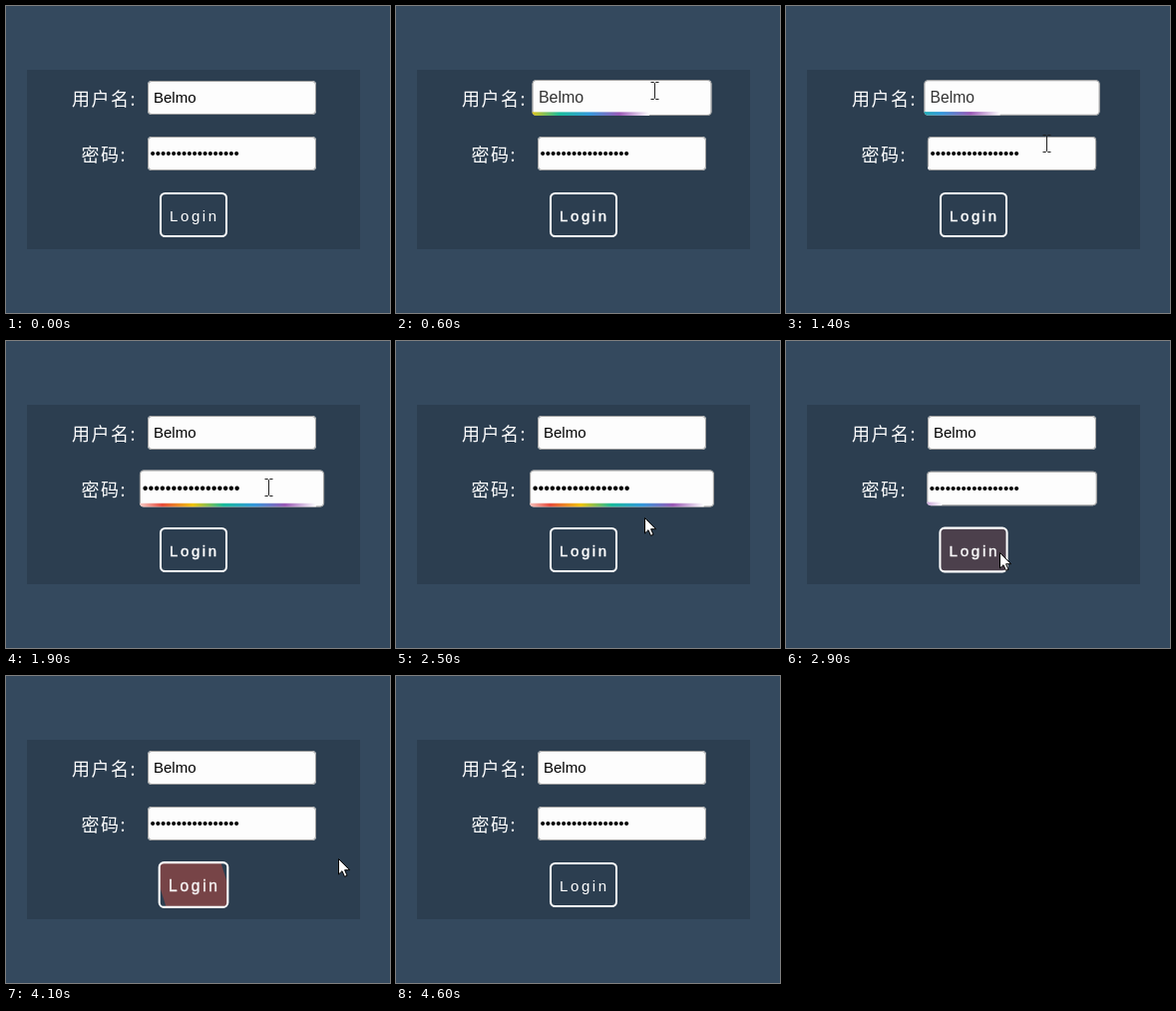
Recreate the animation shown at these times as an HTML page. Size 385x308 px, loop 4.7 s.

```html
<!DOCTYPE html>
<html lang="zh">
<head>
<meta charset="utf-8">
<title>Login form</title>
<style>
  html, body { margin: 0; width: 100%; height: 100%; overflow: hidden; background: #34495e; }
  svg { display: block; width: 385px; height: 308px; }
  .label { font: 18px "Noto Sans CJK SC", "Noto Sans CJK", sans-serif; letter-spacing: 1.5px; fill: #fff; }
  .value { font: 15px "Liberation Sans", Arial, sans-serif; }
  .login { font: 15px "Liberation Sans", Arial, sans-serif; letter-spacing: 2.6px; fill: #fff; stroke: #fff; }
  .edge { fill: none; stroke: #767676; stroke-opacity: .7; }
</style>
</head>
<body>
<svg viewBox="0 0 385 308">
  <defs>
    <linearGradient id="rainbow">
      <stop offset="0" stop-color="#fff"/>
      <stop offset=".167" stop-color="#e74c3c"/>
      <stop offset=".333" stop-color="#f1c40f"/>
      <stop offset=".5" stop-color="#1abc9c"/>
      <stop offset=".667" stop-color="#3498db"/>
      <stop offset=".833" stop-color="#9b59b6"/>
      <stop offset="1" stop-color="#fff"/>
    </linearGradient>
    <clipPath id="fieldClip"><rect x="-84.5" y="-17" width="169" height="34" rx="4"/></clipPath>
    <clipPath id="buttonClip"><rect x="-33" y="-21.5" width="66" height="43" rx="4"/></clipPath>
  </defs>
  <rect width="385" height="308" fill="#34495e"/>
  <rect x="21" y="64" width="334" height="180" fill="#2c3e50"/>
  <text class="label" x="66" y="99.5">用户名:</text>
  <text class="label" x="75.5" y="155.5">密码:</text>
  <g id="fields"></g>
  <g id="button">
    <g clip-path="url(#buttonClip)"><rect id="band" y="-60" height="120" fill="#e74c3c"/></g>
    <rect x="-33" y="-21.5" width="66" height="43" rx="4.5" fill="none" stroke="#fff" stroke-width="2"/>
    <text class="login" id="login" x="-24" y="6">Login</text>
  </g>
  <path id="arrow" d="M.5 .5V16L4 12.7L6.5 18.3L9 17.2L6.6 11.7H11.6Z" fill="#fff" stroke="#000"/>
  <path id="beam" d="M-4 -8.5H-1L0 -7.5L1 -8.5H4M0 -7.5V7.5M-4 8.5H-1L0 7.5L1 8.5H4" fill="none" stroke="#222"/>
</svg>
<script>
const LOOP = 4700, STEP = 100, FADE = 700;
const $ = id => document.getElementById(id);
const mix = (a, b, p) => a + (b - a) * p;

// CSS "ease": cubic-bezier(.25, .1, .25, 1)
function ease(x) {
  if (x <= 0) return 0;
  if (x >= 1) return 1;
  const bezier = (a, b, s) => 3 * a * s * (1 - s) ** 2 + 3 * b * s * s * (1 - s) + s ** 3;
  let lo = 0, hi = 1;
  for (let i = 0; i < 24; i++) {
    const mid = (lo + hi) / 2;
    if (bezier(.25, .25, mid) < x) lo = mid; else hi = mid;
  }
  return bezier(.1, 1, lo);
}

const hover = (t, enter, leave) =>
  ease((t - enter) / FADE) * (1 - ease((t - leave) / FADE));

const fields = [
  { y: 92, text: "Belmo", textX: -78.5, enter: 334, leave: 1170 },
  { y: 148, text: "•".repeat(17), textX: -82, enter: 1385, leave: 2450 }
];

$("fields").innerHTML = fields.map(f => `
  <g>
    <rect x="-84.5" y="-17" width="169" height="34" rx="4" fill="#fdfdfd"/>
    <rect class="edge" x="-84" y="-16.5" width="168" height="33" rx="3.5"/>
    <g clip-path="url(#fieldClip)">
      <rect class="line" y="13.5" width="169" height="3.5" fill="url(#rainbow)"/>
    </g>
    <text class="value" x="${f.textX}" y="5">${f.text}</text>
  </g>`).join("");
fields.forEach((f, i) => {
  f.group = $("fields").children[i];
  f.line = f.group.querySelector(".line");
  f.label = f.group.querySelector("text");
});

// time, x, y
const path = [
  [200, 376, 70], [300, 328, 73], [400, 300, 78], [600, 259, 85],
  [900, 252, 93], [1170, 256, 111], [1400, 261, 138], [1700, 262, 148],
  [2100, 263, 146], [2200, 263, 146], [2400, 257, 161], [2500, 249, 177],
  [2800, 222, 208], [3000, 206, 215], [3300, 218, 201], [3700, 218, 203],
  [3855, 226, 202], [4000, 296, 190], [4100, 333, 183]
];

function cursorAt(t) {
  const i = path.findIndex(k => k[0] >= t);
  if (i < 0) return path[path.length - 1].slice(1);
  if (i === 0) return path[0].slice(1);
  const [a, b] = [path[i - 1], path[i]];
  const p = (t - a[0]) / (b[0] - a[0]);
  return [mix(a[1], b[1], p), mix(a[2], b[2], p)];
}

function draw(t) {
  for (const f of fields) {
    const p = hover(t, f.enter, f.leave);
    f.group.setAttribute("transform", `translate(226.5 ${f.y}) scale(${1 + .1 * p})`);
    f.line.setAttribute("x", -84.5 - 169 * (1 - p));
    f.line.setAttribute("visibility", p > .01 ? "visible" : "hidden");
    f.label.setAttribute("fill", p > .05 && f === fields[0] ? "#333" : "#000");
  }

  const p = hover(t, 2800, 3855);
  const half = mix(36, 25, p);
  $("button").setAttribute("transform", `translate(188 209.5) scale(${1 + .1 * p})`);
  $("band").setAttribute("x", -half);
  $("band").setAttribute("width", 2 * half);
  $("band").setAttribute("transform", `rotate(${-45 * p})`);
  $("band").setAttribute("opacity", p);
  $("login").setAttribute("opacity", 1 - .15 * p);
  $("login").setAttribute("stroke-width", t >= 300 && t < 4600 ? .4 : 0);

  const [x, y] = cursorAt(t);
  const shown = t >= 200 && t < 4200;
  const overText = Math.abs(x - 226.5) < 86 && fields.some(f => Math.abs(y - f.y) < 19);
  for (const [id, on] of [["arrow", shown && !overText], ["beam", shown && overText]]) {
    $(id).setAttribute("visibility", on ? "visible" : "hidden");
    $(id).setAttribute("transform", `translate(${Math.round(x) + (id === "beam" ? .5 : 0)} ${Math.round(y)})`);
  }
}

const start = performance.now();
function tick() {
  const t = (performance.now() - start) % LOOP;
  draw(Math.floor(t / STEP) * STEP);
  requestAnimationFrame(tick);
}
tick();
</script>
</body>
</html>
```
